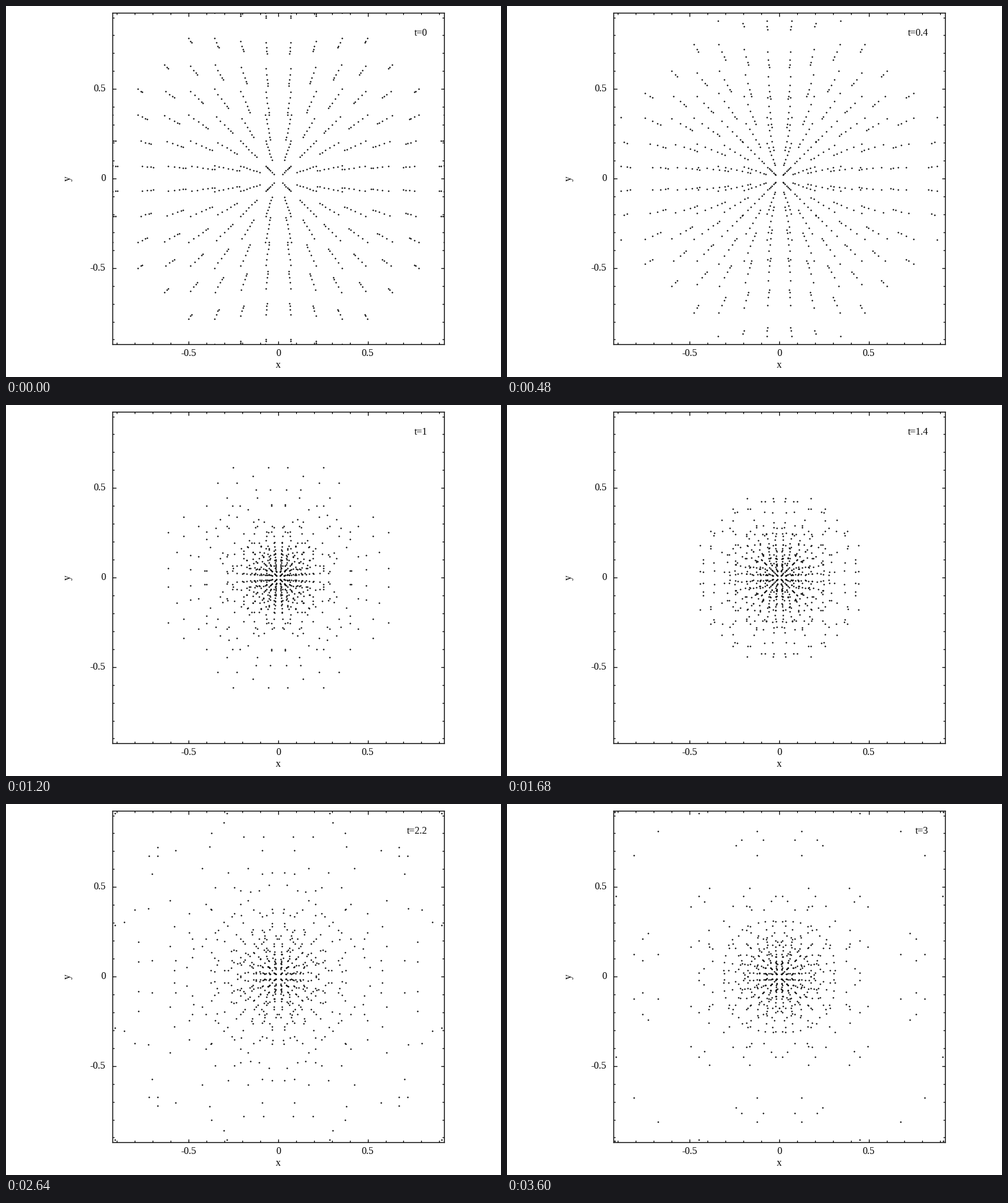
A matplotlib script that plays this animation: 800x600 px, repeating every 3720 ms.

```python
"""Adiabatic collapse of a cold 1/r gas sphere, followed with a small SPH code.

The lattice has full cubic symmetry, so only one particle of every
symmetry family is integrated; the others are its mirror images.
"""
import numpy as np
import matplotlib.pyplot as plt
from matplotlib.animation import FuncAnimation
from matplotlib.ticker import MultipleLocator

FRAMES, INTERVAL, STEP = 31, 120, 0.1
GAMMA, HFAC, TINY = 5 / 3, 1.2, 1e-12

# --- cubic lattice inside the unit sphere ----------------------------------
odd = np.arange(-13, 14, 2)
lattice = np.stack(np.meshgrid(odd, odd, odd), -1).reshape(-1, 3)
lattice = lattice[(lattice**2).sum(1) < 196]
order = np.argsort(abs(lattice), axis=1, kind="stable")
rank = np.argsort(order, axis=1)
sign = np.sign(lattice)
seeds, family = np.unique(np.sort(abs(lattice), axis=1), axis=0,
                          return_inverse=True)
family = family.reshape(-1)
mass = 1 / len(lattice)


def spread(vec):
    """Vectors of all particles from those of the family members."""
    return sign * vec[family[:, None], rank]


# --- cubic spline kernel and its softened gravity --------------------------
def kernel(q):
    return 0.25 * np.maximum(2 - q, 0)**3 - np.maximum(1 - q, 0)**3


def slope(q):
    return 3 * np.maximum(1 - q, 0)**2 - 0.75 * np.maximum(2 - q, 0)**2


def pull(q):
    q = np.maximum(q, 1e-6)
    inner = 4 / 3 * q - 1.2 * q**3 + 0.5 * q**4
    outer = 8 / 3 * q - 3 * q**2 + 1.2 * q**3 - q**4 / 6 - 1 / (15 * q**2)
    return np.where(q < 1, inner, np.where(q < 2, outer, 1 / q**2))


def pull_dh(q):
    inner = 1.4 - 2 * q**2 + 1.5 * q**4 - 0.6 * q**5
    outer = 1.6 - 4 * q**2 + 4 * q**3 - 1.5 * q**4 + 0.2 * q**5
    return np.where(q < 1, inner, np.where(q < 2, outer, 0))


def rates(x, v, u, h):
    """Acceleration, heating rate, smoothing lengths and a safe time step."""
    count = len(h)
    d = x[:, None] - spread(x)[None]
    r2 = np.einsum("ijk,ijk->ij", d, d)
    inv = 1 / np.sqrt(r2 + TINY)
    gravity = -mass * np.einsum("ijk,ij->ik", d, inv**2 * inv)

    reach = 2.6 * np.maximum(h[:, None], h[family])
    i, j = np.nonzero(r2 < reach**2)
    b = family[j]
    r = np.sqrt(r2[i, j])
    n = d[i, j] / (r + 1e-9)[:, None]

    def total(f):
        return mass * np.bincount(i, f, count)

    def density(h):
        q = r / h[i]
        w = kernel(q)
        rho = total(w) / (np.pi * h**3)
        drho = -total(3 * w + q * slope(q)) / (np.pi * h**4)
        return rho, drho

    for _ in range(3):
        rho, drho = density(h)
        goal = mass * (HFAC / h)**3
        grow = (goal - rho) / (3 * goal + h * drho)
        h = h * np.clip(1 + grow, 0.8, 1.25)
    rho, drho = density(h)
    omega = 1 + h * drho / (3 * rho)

    press = (GAMMA - 1) * u / rho
    sound = np.sqrt(GAMMA * (GAMMA - 1) * u)
    qa, qb = r / h[i], r / h[b]
    zeta = -h / (3 * rho) * total(pull_dh(qa) / h[i]**2)
    stress = (press + zeta / 2) / omega
    fa = slope(qa) / (np.pi * h[i]**4)
    fb = slope(qb) / (np.pi * h[b]**4)
    visc = (fa + fb) / (rho[i] + rho[b])
    vr = ((v[i] - spread(v)[j]) * n).sum(1)
    mean_sound = (sound[i] + sound[b]) / 2
    signal = np.where(vr < 0, mean_sound - vr, 0)

    push = signal * vr * visc - stress[i] * fa - stress[b] * fb
    push += 1 / (r**2 + TINY)
    push -= (pull(qa) / h[i]**2 + pull(qb) / h[b]**2) / 2
    acc = gravity + np.stack([total(push * n[:, k]) for k in range(3)], 1)
    heat = total((press / omega)[i] * vr * fa - signal * vr**2 * visc / 2
                 + abs(vr) * (u[i] - u[b]) * visc)
    dt = 0.3 * np.min(h[i] / (mean_sound + abs(vr)))
    return acc, heat, h, max(dt, 0.002)


def collapse():
    """Projected positions of all particles at every output time."""
    x = seeds / 14
    x = x * np.sqrt(np.linalg.norm(x, axis=1))[:, None]
    v = np.zeros_like(x)
    u = np.full(len(x), 0.05)
    radius = np.linalg.norm(x, axis=1)
    h = HFAC * (2 * np.pi * radius * mass)**(1 / 3)
    for _ in range(6):
        acc, heat, h, dt = rates(x, v, u, h)

    shots = [spread(x)[:, :2]]
    for _ in range(FRAMES - 1):
        left = STEP
        while left > 1e-9:
            dt = min(dt, left)
            left -= dt
            half = v + dt / 2 * acc
            x = x + dt * half
            guess = np.maximum(u + dt * heat, 1e-5)
            old = heat
            acc, heat, h, next_dt = rates(x, v + dt * acc, guess, h)
            v = half + dt / 2 * acc
            u = np.maximum(u + dt / 2 * (old + heat), 1e-5)
            dt = next_dt
        shots.append(spread(x)[:, :2])
    return shots


shots = collapse()

# --- plot --------------------------------------------------------------------
PX = 0.72  # points per pixel
plt.rcParams["font.family"] = "Liberation Serif"
plt.rcParams["font.size"] = 16 * PX
plt.rcParams["axes.unicode_minus"] = False

fig = plt.figure(figsize=(8, 6), dpi=100, facecolor="white")
MID_X, MID_Y, HALF = 439.9, 279.0, 268.4
ax = fig.add_axes([(MID_X - HALF) / 800, 1 - (MID_Y + HALF) / 600,
                   HALF / 400, HALF / 300])
lim = abs(shots[0]).max()
ax.set(xlim=(-lim, lim), ylim=(-lim, lim))
for axis in (ax.xaxis, ax.yaxis):
    axis.set_major_locator(MultipleLocator(0.5))
    axis.set_minor_locator(MultipleLocator(0.1))
ax.tick_params(which="both", direction="in", top=True, right=True,
               labelleft=False, labelbottom=False, width=1.3 * PX)
ax.tick_params(which="major", length=5.5 * PX)
ax.tick_params(which="minor", length=3 * PX)
for spine in ax.spines.values():
    spine.set_linewidth(1.4 * PX)


def label(x, y, text, ha="center", **style):
    return fig.text(x / 800, 1 - y / 600, text, ha=ha, va="baseline", **style)


for value in (-0.5, 0, 0.5):
    shift = value / lim * HALF
    label(MID_X + shift, 566, f"{value:g}")
    label(161, MID_Y - shift + 4, f"{value:g}", ha="right")
label(MID_X, 585, "x")
label(104, MID_Y, "y", rotation=90, rotation_mode="anchor")
clock = label(681, 48, "t=0", ha="right")
dots, = ax.plot([], [], "o", color="black", ms=2 * PX, mew=0)


def update(k):
    dots.set_data(*shots[k].T)
    clock.set_text(f"t={k * STEP:.2g}")
    return dots, clock


anim = FuncAnimation(fig, update, frames=FRAMES, interval=INTERVAL,
                     repeat=True, repeat_delay=0, blit=False)
plt.show()
```
